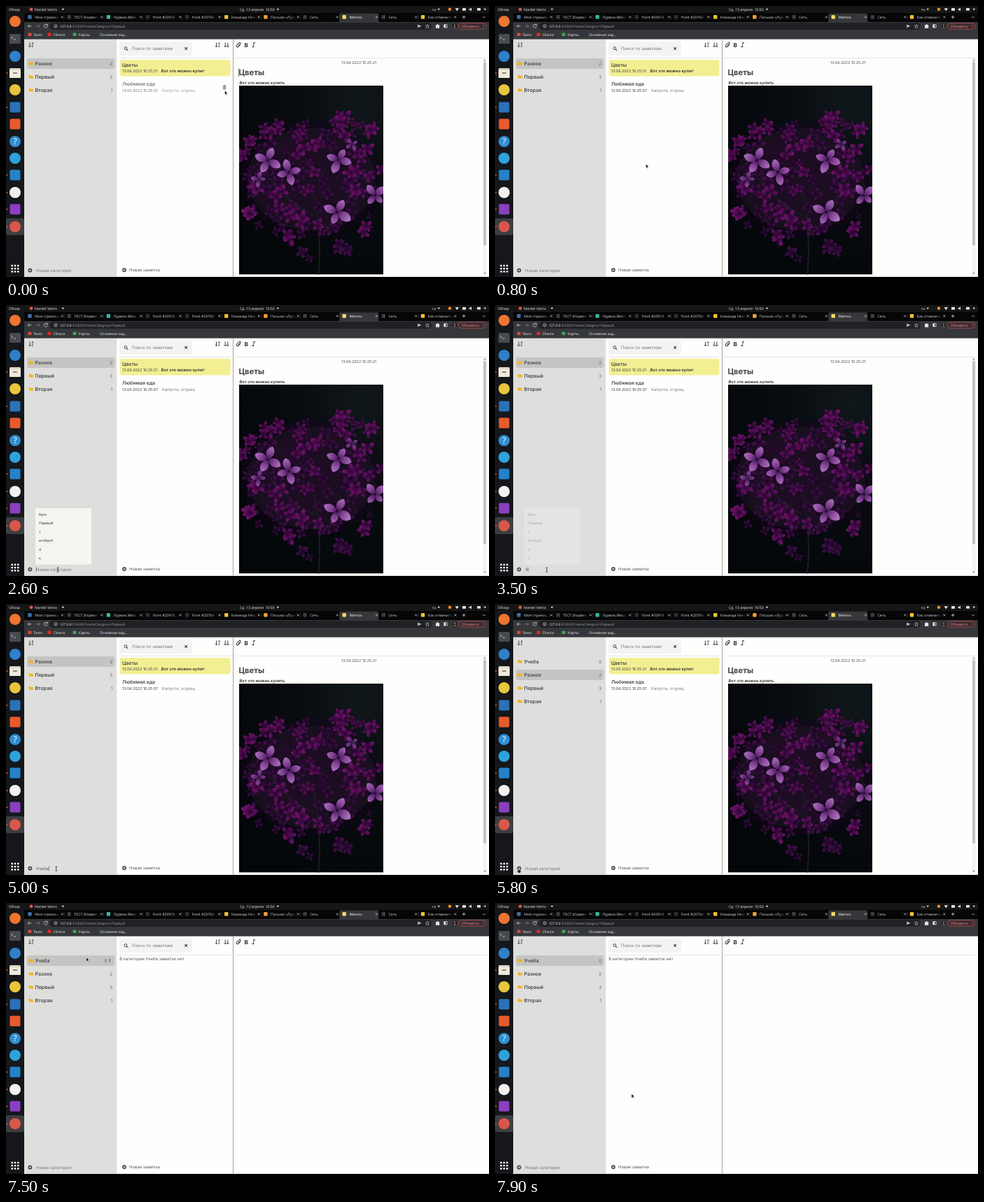
Write an HTML page that moves like this. It is 690 px wide and 388 px high and loops after 8 s.

```html
<!DOCTYPE html>
<html lang="ru">
<head>
<meta charset="utf-8">
<title>Заметки</title>
<style>
html, body { margin: 0; width: 100%; height: 100%; overflow: hidden; background: #fefefc; }
svg { display: block; width: 100vw; height: 100vh; }
text { font-family: Inter, sans-serif; text-rendering: geometricPrecision; white-space: pre; }
.sys text { font-family: "Noto Sans", sans-serif; }
</style>
</head>
<body>
<svg id="stage" viewBox="0 0 690 388" xmlns="http://www.w3.org/2000/svg">
  <defs>
    <linearGradient id="fade"><stop offset="0" stop-color="#060607" stop-opacity="0"/><stop offset="1" stop-color="#060607"/></linearGradient>
    <radialGradient id="night" cx=".85" cy=".1" r="1">
      <stop offset="0" stop-color="#10171a"/><stop offset=".45" stop-color="#080c10"/><stop offset="1" stop-color="#04070a"/>
    </radialGradient>
    <linearGradient id="petal" gradientUnits="userSpaceOnUse" x1="0" y1="0" x2="20" y2="0">
      <stop offset="0" stop-color="#3f1752"/><stop offset=".45" stop-color="#834193"/><stop offset="1" stop-color="#ab74be"/>
    </linearGradient>
    <linearGradient id="wine" gradientUnits="userSpaceOnUse" x1="0" y1="0" x2="12" y2="0">
      <stop offset="0" stop-color="#2b0530"/><stop offset="1" stop-color="#861680"/>
    </linearGradient>
    <linearGradient id="plum" gradientUnits="userSpaceOnUse" x1="0" y1="0" x2="12" y2="0">
      <stop offset="0" stop-color="#1c0524"/><stop offset="1" stop-color="#55145f"/>
    </linearGradient>
    <filter id="soft"><feGaussianBlur stdDeviation=".7"/></filter>
    <filter id="haze" x="-30%" y="-30%" width="160%" height="160%"><feGaussianBlur stdDeviation="9"/></filter>
    <clipPath id="frame"><rect x="333" y="114" width="206" height="270.5"/></clipPath>
  </defs>
  <g id="base"></g>
  <g id="list"></g>
  <g id="editor">
    <g id="photo" clip-path="url(#frame)"></g>
  </g>
  <g id="live"></g>
</svg>
<script>
const $ = id => document.getElementById(id);
const LOOP = 8000, STEP = 100;

const text = (x, y, s, size = 6, fill = '#555', attrs = '') =>
  `<text x="${x}" y="${y}" font-size="${size}" fill="${fill}" ${attrs}>${s}</text>`;
const rect = (x, y, w, h, fill, rx = 0, attrs = '') =>
  `<rect x="${x}" y="${y}" width="${w}" height="${h}" rx="${rx}" fill="${fill}" ${attrs}/>`;
const disc = (x, y, r, fill, attrs = '') => `<circle cx="${x}" cy="${y}" r="${r}" fill="${fill}" ${attrs}/>`;
const line = (d, stroke, w = 1, attrs = '') =>
  `<path d="${d}" fill="none" stroke="${stroke}" stroke-width="${w}" ${attrs}/>`;
const fill = (d, color) => `<path d="${d}" fill="${color}"/>`;
const cross = (x, y, r, color, w) =>
  line(`M${x - r} ${y - r}l${2 * r} ${2 * r}m0 ${-2 * r}l${-2 * r} ${2 * r}`, color, w);
const BOLD = 'font-weight="600"';
const ITALIC = 'font-weight="600" font-style="italic"';
const TIGHT = 'letter-spacing="-.12"';
const TABS = '#060607', BAR = '#36373a';

function systemBar() {
  const white = '#e6e6e6';
  return rect(0, 0, 690, 10, '#161616')
    + text(4, 6.6, 'Обзор', 5.2, white)
    + disc(36, 4.8, 2.4, '#d9574a')
    + text(41, 6.6, 'Nordel Vetrix', 5.2, white)
    + fill('M79.6 3.8h3.6l-1.8 2.4z', white)
    + text(334, 6.6, 'Ср, 13 апреля  10:50', 5.1, white, 'font-weight="500"')
    + disc(388.5, 4.6, 1.2, white)
    + text(609, 6.6, 'ru', 5.2, white)
    + fill('M616.4 3.8h3.6l-1.8 2.4z', white)
    + disc(634, 4.8, 2.3, '#f08a24')
    + fill('M641.6 3.2h5.4l-2.7 4z', white)
    + rect(652, 3, 5, 3.8, white, .6)
    + fill('M661.5 3.9h1.5l2-1.6v5l-2-1.6h-1.5z', white)
    + rect(673, 3, 5, 3.4, white, .5)
    + fill('M682.4 3.8h3.6l-1.8 2.4z', white);
}

function tabs() {
  const items = [
    ['Моя страница', '#3f6ea8'], ['ТЕСТ (Корвел', '#3a3d42'], ['Лурвик.Месс', '#35b8a0'],
    ['front #20918', '#2b2f36'], ['front #20764', '#2b2f36'], ['Команда Нево', '#f2c230'],
    ['Письмо «Лурв', '#f0a030'], ['Сеть', '#3a3d42'], ['Memos', '#f0dc62'],
    ['Сеть', '#3a3d42'], ['Как отменить', '#f2c230']];
  let s = rect(26, 10, 664, 13, TABS);
  items.forEach(([name, color], i) => {
    const x = 34 + 56.15 * i, on = i === 8;
    if (on) s += fill(`M${x - 7} 23v-10.5q0-2 2-2h52q2 0 2 2v10.5z`, BAR);
    s += rect(x - 2.7, 13.1, 5.4, 5.4, color, 1)
      + text(x + 7.2, 17.9, name, 5.25, on ? '#f2f2f2' : '#c9cbce');
    if (!on) s += rect(x + 34, 11, 9, 11, 'url(#fade)') + rect(x + 42.9, 11, 6, 11, TABS);
    s += cross(x + 46.3, 15.9, 1.5, '#d4d4d4', .7);
    if (i < 10 && i !== 7 && !on) s += line(`M${x + 49.4} 13v6`, '#45474b', .5);
  });
  return s + line('M651.8 15.9h4.6m-2.3-2.3v4.6', '#ddd', .8) + line('M681 15l2 2 2-2', '#ccc', .7);
}

function toolbar() {
  const g = '#cfd0d2';
  let s = rect(26, 23, 664, 24.6, BAR)
    + rect(62, 24, 546, 10, '#202124', 5)
    + line('M36.4 28.8h-5m2.2-2.2l-2.2 2.2 2.2 2.2', g, .8)
    + line('M43 28.8h5m-2.2-2.2l2.2 2.2-2.2 2.2', '#818285', .8)
    + line('M59 27.3a2.5 2.5 0 1 0 .3 2M59.3 25.8v2h-2', g, .8)
    + disc(71, 28.8, 2.2, 'none', `stroke="${g}" stroke-width=".7"`) + line('M71 28v2.1', g, .7)
    + text(77, 30.7, '127.0.0.1<tspan fill="#9a9ca0">:5500/?nameCategory=Первый</tspan>', 4.9, '#f0f0f0')
    + fill('M587.5 26.4l6 2.4-6 2.4 1.2-2.4z', g)
    + line('M602 26.2l.8 1.9 2 .2-1.5 1.3.5 2-1.8-1.1-1.8 1.1.5-2-1.5-1.3 2-.2z', g, .6)
    + fill('M614 27.2h1.4a1.1 1.1 0 0 1 2.2 0h1.6v4.6h-5.2z', '#e8e8e8')
    + rect(625.4, 26.2, 5, 5, '#e8e8e8', .5) + rect(628, 27, 1.6, 3.4, BAR)
    + disc(641, 28.8, 3.2, '#1d1d20') + disc(641, 27.6, 1.1, '#b98f76') + fill('M639.2 31.3q1.8-3.6 3.6 0z', '#b98f76')
    + rect(646.5, 24.6, 39.5, 8.6, '#3a2d30', 4.3, 'stroke="#c4575b" stroke-width=".7"')
    + text(650.5, 30.7, 'Обновить', 5.2, '#ee7f80')
    + [27, 28.8, 30.6].map(y => disc(682, y, .5, '#ee7f80')).join('');
  [[34, 'Tavro', '#d9493d', 39], [62, 'Clivora', '#e02a23', 67.5], [98, 'Карты', '#3fa35a', 104],
   [129, 'Основная зад…', '#2d3552', 134]].forEach(([x, name, color, tx]) => {
    s += rect(x - 2.5, 38.4, 5, 4.6, color, .8) + text(tx, 42.8, name, 5.2, '#e4e4e4');
  });
  return s;
}

function dock() {
  let s = rect(0, 10, 26, 378, '#15171b') + rect(0, 304, 26, 24, '#3d3e41', 2);
  const round = [[22, '#ee7430'], [72, '#2f7fc9'], [194, '#2f8fd3'], [218, '#2ea2dc'], [267, '#f3f1ef'], [316, '#d9574a']];
  const square = [[145, '#2a72b8'], [169, '#e95a2b'], [242, '#2482c8'], [291, '#8a3fc0']];
  round.forEach(([y, c]) => s += disc(13, y, 8, c));
  square.forEach(([y, c]) => s += rect(5.5, y - 7.5, 15, 15, c, 2));
  s += rect(5, 40, 16, 14, '#474b50', 1.5) + line('M7.5 44l2 1.6-2 1.6M11 48h3', '#ddd', .8)
    + rect(5, 89, 16, 14, '#d9d2c4', 1.5) + rect(5, 91.5, 16, 11.5, '#efe9dc', 1.5) + rect(10, 95, 6, 2, '#8d8778', .5)
    + disc(13, 120, 8, '#e8c63c')
    + text(13, 198.2, '?', 12, '#fff', 'text-anchor="middle"');
  [96, 145, 242, 267, 291, 316].forEach(y => s += disc(1.4, y, 1, '#e95a2b'));
  for (let i = 0; i < 9; i++) s += rect(7.4 + (i % 3) * 4.3, 370.4 + (i / 3 | 0) * 4.3, 2.6, 2.6, '#f2f2f2', .6);
  return s;
}

const arrow = (x, up) => line(`M${x} 52.4v6.4m-1.6-1.6l1.6 1.7 1.6-1.7`, '#444', 1,
  up ? `transform="rotate(180 ${x} 55.6)"` : '');
const sortAZ = x => arrow(x - 2, false)
  + text(x + .6, 55.2, 'A', 4.2, '#444', 'font-weight="700"') + text(x + .6, 59.3, 'Z', 4.2, '#444', 'font-weight="700"');
const plus = (x, y, bg) => disc(x, y, 2.9, '#484848') + line(`M${x - 1.6} ${y}h3.2m-1.6-1.6v3.2`, bg, .8);

function panels() {
  return rect(26, 47.6, 132.5, 341, '#dededd') + rect(158.5, 47.6, 531.5, 341, '#fefefc')
    + line('M324.5 47.6V388', '#8d8d8d', .8)
    + line('M26 387.6H690', '#b9b9b9', .7)
    + line('M162 74.4h159M328 74.4h358.5', '#dcdcda', .7)
    + sortAZ(36) + sortAZ(302.5) + arrow(313.2, false) + arrow(316.9, false)
    + rect(162, 51.2, 104, 19.8, '#f3f3f2', 3)
    + disc(170.9, 60.5, 1.9, 'none', 'stroke="#444" stroke-width="1"') + line('M172.3 61.9l2 2', '#444', 1.1)
    + text(180, 63, 'Поиск по заметкам', 6.05, '#747474')
    + cross(257.2, 60.9, 1.7, '#333', 1.1)
    + line('M334.8 55.4l-3 3a1.5 1.5 0 0 1-2.2-2.2l3.6-3.6a1.1 1.1 0 0 1 1.7 1.6l-3.4 3.4', '#444', 1.1)
    + text(340.6, 58.6, 'B', 8.2, '#444', 'font-weight="800"')
    + line('M352.8 52.7h3.4m-1.7 0l-1.6 5.8m-1.7 0h3.4', '#444', 1)
    + plus(34.4, 378.5, '#dededd') + plus(169, 378, '#fefefc')
    + text(176, 380.2, 'Новая заметка', 6, '#555');
}

function article() {
  return text(479, 83.2, '13.04.2022 10:25:21', 5.6, '#555', TIGHT)
    + text(332.4, 99.2, 'Цветы', 11.3, '#474747', 'font-weight="700"')
    + text(333.5, 112.4, 'Вот это можно купить', 5.85, '#2f2f2f', ITALIC)
    + rect(681.5, 75, 5, 310.5, '#f2f2f1') + rect(682, 80.5, 4, 262, '#c3c3c3')
    + fill('M682.6 78.4h2.8l-1.4-1.8z', '#777') + fill('M682.6 381.8h2.8l-1.4 1.8z', '#555');
}

let seed = 11;
const rnd = () => (seed = (seed * 16807) % 2147483647) / 2147483647;
const spread = n => (rnd() - .5) * n;

function flower(x, y, r, turn, color, mid) {
  let s = `<g transform="translate(${x} ${y}) rotate(${turn})">`;
  for (let i = 0; i < 4; i++) {
    const n = r * (.85 + rnd() * .25);
    s += `<path transform="rotate(${i * 90 + spread(24)})" d="M0 0C${n * .3} ${-n * .36} ${n * .75} ${-n * .42} ${n} 0C${n * .8} ${n * .38} ${n * .3} ${n * .36} 0 0z" fill="${color}"/>`;
  }
  return s + disc(0, 0, r * .1, mid) + '</g>';
}

function picture() {
  const heads = [
    [352, 188], [372, 182], [396, 174], [425, 183], [466, 160], [488, 160], [500, 172], [476, 180],
    [518, 178], [448, 196], [345, 212], [420, 207], [508, 212], [497, 236], [440, 232], [528, 240],
    [352, 266], [386, 268], [425, 262], [398, 296], [422, 306], [356, 290], [446, 320], [410, 328],
    [500, 262], [484, 346], [512, 322], [432, 358]];
  const bright = [[374, 221, 19, 30], [404, 238, 20, 75], [475, 220, 19, 20], [527, 271, 17, 50],
    [473, 295, 21, 20], [361, 248, 11, 10], [494, 198, 9, 55]];
  let s = rect(333, 114, 206, 270.5, 'url(#night)')
    + '<ellipse cx="436" cy="248" rx="92" ry="74" fill="#1c0724" filter="url(#haze)"/>'
    + line('M446 388Q452 330 440 270M440 300Q400 280 372 240M448 330Q490 300 500 230', '#1c1a22', 2)
    + '<g filter="url(#soft)">';
  // shaded blossoms fill the inside of the cluster
  for (let i = 0; i < 70; i++) {
    const a = rnd() * 2 * Math.PI, d = Math.sqrt(rnd());
    s += flower(438 + 98 * d * Math.cos(a), 262 + 95 * d * Math.sin(a), 5 + rnd() * 6, rnd() * 90, 'url(#plum)', '#14041a');
  }
  for (const [x, y] of heads)
    for (let k = 0; k < 3; k++)
      s += flower(x + spread(20), y + spread(16), 6 + rnd() * 5, rnd() * 90, y < 335 ? 'url(#wine)' : 'url(#plum)', '#2b0630');
  s += '</g>';
  for (const [x, y, r, a] of bright)
    s += disc(x, y, r * .6, '#150620', 'filter="url(#soft)"') + flower(x, y, r, a, 'url(#petal)', '#2a0d36');
  return s;
}

// Pointer: [time, x, y], eased between stops
const path = [[0, 312.5, 121], [100, 312.5, 121], [1700, 74, 379], [4900, 74, 379], [5600, 33.8, 378.5],
  [5800, 33.8, 378.5], [6600, 117.5, 66.5], [6700, 117, 71], [6900, 117, 71], [7000, 114.8, 77.8],
  [7500, 114.8, 77.8], [7700, 195, 273], [LOOP, 195, 273]];
function pointer(t) {
  const i = Math.max(1, path.findIndex(p => p[0] >= t));
  const [t0, x0, y0] = path[i - 1], [t1, x1, y1] = path[i];
  const k = (t - t0) / (t1 - t0), e = k * k * (3 - 2 * k);
  return [x0 + (x1 - x0) * e, y0 + (y1 - y0) * e];
}

const ARROW = 'M0 0V6L1.4 4.8 2.3 6.9 3.3 6.4 2.4 4.4 4.2 4.3z';
const HAND = 'M-.6 0Q0-.8 .6 0V2.4L2.8 3Q3.4 3.4 3.2 4.4L2.6 6.6H-.6L-2.4 3.8Q-2 2.8 -.6 3.4z';
function cursor(x, y) {
  const low = y > 372;
  if (low && x >= 41 && x < 155) return line(`M${x - 1.2} ${y - 3}h2.4m-1.2 0v6m-1.2 0h2.4`, '#222', .8);
  return `<path transform="translate(${x} ${y})" d="${low && x < 41 ? HAND : ARROW}" fill="#111" stroke="#fff" stroke-width=".5" stroke-linejoin="round"/>`;
}

function folders(t, x, y) {
  const rows = [['Разное', 2], ['Первый', 3], ['Вторая', 1]];
  if (t >= 5800) rows.unshift(['Учеба', 0]);
  const active = t >= 5800 && t < 7500 ? 1 : 0;
  return rows.map(([name, count], i) => {
    const c = 82.2 + 19 * i;
    const over = x > 30 && x < 155 && Math.abs(y - c) < 7.5;
    let s = '';
    if (i === active || over) s += rect(30, c - 7.3, 125.5, 15, i === active ? '#c4c4c3' : '#cfcfce', 3);
    s += fill(`M32.8 ${c - 2.2}h2.2l.9.9h3v3.7h-6.1z`, '#f3b50f')
      + text(41.5, c + 2.4, name, 7, '#474747', BOLD)
      + text(over ? 144.4 : 152.2, c + 2.3, count, 6.3, '#666', 'text-anchor="end"');
    if (over) s += [-1.9, 0, 1.9].map(d => disc(148.4, c + d, .75, '#444')).join('');
    return s;
  }).join('');
}

function cards(t, x, y) {
  if (t >= 7500) return text(162.2, 82, 'В категории Учеба заметок нет', 6.05, '#555');
  const over = x > 162 && x < 321 && y > 103 && y < 130;
  let s = rect(162.8, 77.1, 157.8, 23.3, '#f2ef92', 3)
    + text(166, 86.7, 'Цветы', 6.9, '#474747', BOLD)
    + text(166, 95.4, '13.04.2022 10:25:21', 5.6, '#444', TIGHT)
    + text(221.5, 95.4, 'Вот это можно купит', 5.9, '#2f2f2f', ITALIC)
    + `<g opacity="${over ? .7 : 1}">`
    + text(166, 114.2, 'Любимая еда', 6.9, '#474747', BOLD)
    + text(166, 122.9, '13.04.2022 10:25:07', 5.6, '#444', TIGHT)
    + text(223, 122.9, 'Капуста, огурец', 5.9, '#777') + '</g>';
  if (over) s += rect(309.6, 113.9, 4.8, .9, '#777') + rect(311, 113.2, 2, .8, '#777')
    + rect(310, 115.3, 4, 4.2, '#858585', .5) + line('M311.2 116v2.8m1.6-2.8v2.8', '#ddd', .4);
  return s;
}

const typed = [[3400, 3.9], [3700, 7.4], [4200, 11], [4300, 14.7], [4400, 18.1]];
function entry(t) {
  const n = typed.filter(k => t >= k[0]).length;
  const open = t >= 2000 && t < 5800;
  let s = open && n ? text(43, 380.6, 'Учеба'.slice(0, n), 6.1, '#555')
    : text(43, 380.7, 'Новая категория', 6.1, '#7a7a7a');
  if (open) s += line(`M${43.3 + (n ? typed[n - 1][1] : 0)} 375.6v6`, '#333', .6);
  const show = t < 2000 ? 0 : t < 2100 ? .5 : Math.min(1, Math.max(0, 1 - (t - 3300) / 285));
  if (show) {
    s += `<g class="sys" opacity="${show.toFixed(2)}">` + rect(42, 291, 80, 80.5, '#f4f4f1', 1);
    ['Rem', 'Первый', '1', 'erolkpnl', '4', 'ь'].forEach((w, i) => s += text(47, 302 + 12.45 * i, w, 5.2, '#333'));
    s += '</g>';
  }
  return s;
}

function draw(t) {
  const [x, y] = pointer(t);
  $('list').innerHTML = folders(t, x, y) + cards(t, x, y) + entry(t);
  $('editor').style.display = t < 7500 ? '' : 'none';
  const caret = t < 1700 && t % 1000 < 500 ? line('M332.4 88.6v13', '#333', .6) : '';
  $('live').innerHTML = caret + cursor(x, y);
}

$('base').innerHTML = panels() + '<g class="sys">' + systemBar() + tabs() + toolbar() + dock() + '</g>';
$('photo').innerHTML = picture();
$('editor').insertAdjacentHTML('afterbegin', article());

let last = -1;
const start = performance.now();
function tick(now) {
  const t = Math.floor((Math.max(0, now - start) % LOOP) / STEP) * STEP;
  if (t !== last) draw(last = t);
  requestAnimationFrame(tick);
}
draw(0);
requestAnimationFrame(tick);
</script>
</body>
</html>
```
